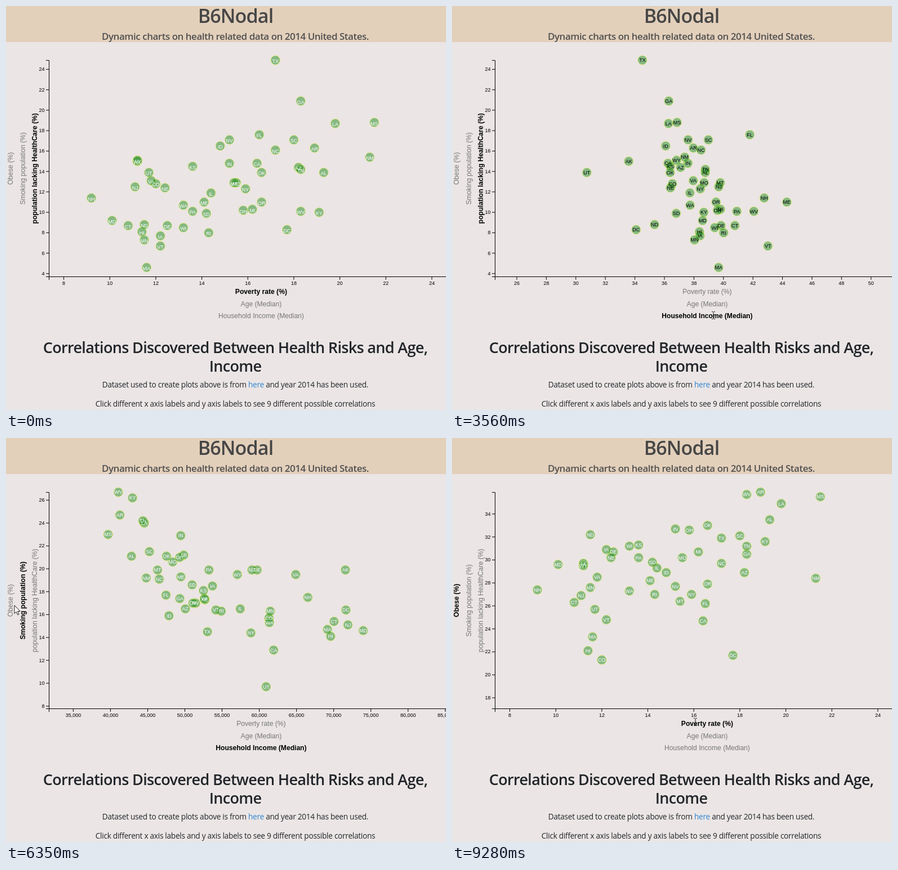
An HTML page for the animation above (9.6 s loop, 781 by 717 pixels).

```html
<!DOCTYPE html>
<html lang="en">
<head>
<meta charset="utf-8">
<title>Health risk scatter plot</title>
<style>
  html, body { margin: 0; width: 100%; height: 100%; overflow: hidden; background: #ebe5e5; }
  svg { display: block; width: 781px; height: 717px; font-family: "Liberation Sans", Arial, sans-serif; }
  .page { font-family: "Open Sans", "Noto Sans", sans-serif; text-anchor: middle; fill: #212529; }
  .head { font-weight: 600; letter-spacing: -.025em; }
  .h1 { font-size: 34px; fill: #464646; }
  .h2 { font-size: 16.9px; fill: #505050; }
  .h3 { font-size: 27px; }
  .body { font-size: 13.64px; letter-spacing: -.02em; }
  .link { fill: #2f86cf; }
  .axis path, .tick line { fill: none; stroke: #000; }
  .tick text { font-size: 9px; }
  .x text { text-anchor: middle; }
  .y text { text-anchor: end; }
  .label { font-size: 12.1px; text-anchor: middle; fill: #777; }
  .label.hover { fill: #000; }
  .label.active { fill: #000; font-weight: bold; }
  .dots circle { fill: green; stroke: #d2ec00; stroke-width: 1; opacity: .43; }
  .names { font-size: 9px; text-anchor: middle; }
</style>
</head>
<body>
<svg id="stage" viewBox="0 0 781 717">
  <rect width="781" height="64" fill="#e3d0bb"/>
  <g class="page">
    <text class="head h1" x="407.5" y="30">B6Nodal</text>
    <text class="head h2" x="407" y="60">Dynamic charts on health related data on 2014 United States.</text>
    <text class="head h3" x="407" y="616">Correlations Discovered Between Health Risks and Age,</text>
    <text class="head h3" x="407" y="649">Income</text>
    <text class="body" x="407" y="676.5">Dataset used to create plots above is from <tspan class="link">here</tspan> and year 2014 has been used.</text>
    <text class="body" x="407" y="711">Click different x axis labels and y axis labels to see 9 different possible correlations</text>
  </g>
  <g class="axis x" id="xAxis"><path d="M76.5 486V480.5H829.5V486"/></g>
  <g class="axis y" id="yAxis"><path d="M71 96.5H76.5V480.5H71"/></g>
  <g id="labels"></g>
  <g class="dots" id="dots"></g>
  <g class="names" id="names"></g>
  <g id="cursor">
    <path id="arrow" d="M0 0V14.5L3.4 11.4 5.7 16.8 8 15.8 5.7 10.5H10.2Z" fill="#fff" stroke="#000" stroke-width=".9"/>
    <path id="beam" d="M-3 -6.5H-1L0 -5.5 1 -6.5H3M0 -5.5V5.5M-3 6.5H-1L0 5.5 1 6.5H3" fill="none" stroke="#222"/>
  </g>
</svg>
<script>
const LOOP = 9600, MOVE = 1000;
const LEFT = 76.4, WIDTH = 753, BOTTOM = 480.7, HEIGHT = 384.6;

const states = ('AL AK AZ AR CA CO CT DE DC FL GA HI ID IL IN IA KS KY LA ME MD MA MI MN MS MO ' +
  'MT NE NV NH NJ NM NY NC ND OH OK OR PA RI SC SD TN TX UT VT VA WA WV WI WY').split(' ');

// One value per state, in the order above.
const data = {
  poverty: [19.3, 11.2, 18.2, 18.9, 16.4, 12, 10.8, 12.5, 17.7, 16.5, 18.3, 11.4, 14.8, 14.4, 15.2, 12.2, 13.6,
    19.1, 19.8, 14.1, 10.1, 11.6, 16.2, 11.5, 21.5, 15.5, 15.4, 12.4, 15.2, 9.2, 11.1, 21.3, 15.9, 17.2,
    11.5, 15.8, 16.6, 16.6, 13.6, 14.3, 18, 14.2, 18.3, 17.2, 11.7, 12.2, 11.8, 13.2, 18.3, 13.2, 11.2],
  age: [38.6, 33.3, 36.9, 37.8, 36, 36.3, 40.5, 39.6, 33.8, 41.6, 36.1, 38.1, 35.9, 37.5, 37.4, 38.2, 36.2,
    38.5, 36.1, 44.1, 38.3, 39.4, 39.6, 37.8, 36.7, 38.5, 39.6, 36.2, 37.4, 42.5, 39.4, 37.2, 38.2, 38.3,
    35.1, 39.4, 36.2, 39.3, 40.7, 39.8, 38.8, 36.6, 38.6, 34.3, 30.5, 42.8, 37.7, 37.5, 41.9, 39.2, 36.6],
  income: [42830, 71583, 50068, 41262, 61933, 61303, 70048, 59716, 71648, 47463, 49321, 69592, 47861, 57444,
    49446, 53712, 52504, 42958, 44555, 49462, 73971, 69160, 49847, 61481, 39680, 48363, 46328, 52686, 51450,
    66532, 71919, 44803, 58878, 46556, 59029, 49308, 47529, 51075, 53234, 54891, 45238, 50979, 44361, 53035,
    60922, 54166, 64902, 61366, 41059, 52622, 57055],
  healthcare: [13.9, 15, 14.4, 16.3, 14.8, 12.8, 8.7, 8.7, 8.3, 17.6, 20.9, 8.1, 16.5, 11.9, 14.8, 7.7, 14.5,
    10, 18.7, 11, 9.2, 4.6, 10.3, 7.3, 18.8, 12.9, 12.9, 12.4, 17.1, 11.4, 12.5, 15.4, 12.3, 16.1,
    8.8, 10.2, 13.9, 11, 10.1, 8, 17.1, 9.9, 14.2, 24.9, 13.9, 6.7, 13.1, 10.7, 10.1, 8.5, 15.1],
  smokes: [21.1, 19.9, 16.5, 24.7, 12.9, 15.7, 15.4, 19.9, 16.4, 17.7, 17.4, 14.1, 15.9, 16.5, 22.9, 18.5, 18.1,
    26.2, 24, 19.3, 14.6, 14.7, 21.2, 16.3, 23, 20.6, 19.9, 17.3, 17, 17.5, 15.1, 19.2, 14.4, 19.1,
    19.9, 21, 21.1, 17, 19.9, 16.3, 21.5, 18.6, 24.2, 14.5, 9.7, 16.4, 19.5, 15.3, 26.7, 17.4, 19.5],
  obesity: [33.5, 29.7, 28.9, 35.9, 24.7, 21.3, 26.3, 30.7, 21.7, 26.2, 30.5, 22.1, 28.9, 29.3, 32.7, 30.9, 31.3,
    31.6, 34.9, 28.2, 29.6, 23.3, 30.7, 27.6, 35.5, 30.2, 26.4, 30.2, 27.7, 27.4, 26.9, 28.4, 27, 29.7,
    32.2, 32.6, 33, 27.9, 30.2, 27, 32.1, 29.8, 31.2, 31.9, 25.7, 24.8, 28.5, 27.3, 35.7, 31.2, 29.5]
};

const labelText = {
  poverty: 'Poverty rate (%)', age: 'Age (Median)', income: 'Household Income (Median)',
  obesity: 'Obese (%)', smokes: 'Smoking population (%)', healthcare: 'population lacking HealthCare (%)'
};
const axisVars = { x: ['poverty', 'age', 'income'], y: ['obesity', 'smokes', 'healthcare'] };

const WHITE = [255, 255, 255], BLACK = [0, 0, 0], RED = [255, 0, 0];
const clicks = [
  { at: 1783, hover: 1600, axis: 'x', name: 'age', color: BLACK },
  { at: 3436, hover: 3020, axis: 'x', name: 'income', color: RED },
  { at: 4950, hover: 4650, axis: 'y', name: 'smokes', color: WHITE },
  { at: 6713, hover: 6520, axis: 'y', name: 'obesity', color: WHITE },
  { at: 8272, hover: 8080, axis: 'x', name: 'poverty', color: WHITE }
];

// Pointer path: time, x, y, and whether it is a text beam from there on.
const route = [
  [590, 588, 686, 0], [900, 492, 640, 0], [1380, 388, 537, 0], [1530, 388, 537, 0], [1700, 464, 535, 1],
  [2950, 464, 535, 1], [3240, 464, 549, 1], [3600, 464, 549, 0], [4250, 95, 352, 0], [4640, 34, 304, 1],
  [4730, 29, 298, 1], [5860, 29, 298, 0], [6200, 15, 297, 0], [6400, 15, 297, 0], [6520, 8, 295, 1],
  [6860, 8, 295, 0], [7500, 376, 453, 0], [8080, 428, 501, 1], [8180, 432, 504, 1], [LOOP, 432, 504, 1]
];

const $ = id => document.getElementById(id);
const lerp = (a, b, p) => a + (b - a) * p;
const clamp = v => Math.max(0, Math.min(1, v));
const ease = t => t < .5 ? 4 * t ** 3 : 1 - 4 * (1 - t) ** 3;

function add(parent, tag, attrs = {}, text = '') {
  const node = document.createElementNS('http://www.w3.org/2000/svg', tag);
  for (const key in attrs) node.setAttribute(key, attrs[key]);
  node.textContent = text;
  return parent.appendChild(node);
}

function makeScale(name, axis) {
  const low = Math.min(...data[name]) * .8;
  const high = Math.max(...data[name]) * (axis === 'x' ? 1.2 : 1);
  const step = name === 'income' ? 5000 : 2;
  const ticks = [];
  for (let v = Math.ceil(low / step) * step; v <= high; v += step) ticks.push(v);
  const place = v => {
    const part = (v - low) / (high - low);
    return axis === 'x' ? LEFT + part * WIDTH : BOTTOM - part * HEIGHT;
  };
  return { place, ticks: new Set(ticks) };
}

const scales = {}, labels = {}, tickNodes = { x: new Map(), y: new Map() };
for (const axis of ['x', 'y']) {
  axisVars[axis].forEach((name, i) => {
    scales[name] = makeScale(name, axis);
    const spot = axis === 'x' ? `translate(452.9 ${511 + 21.5 * i})` : `translate(${12 + 21.6 * i} 288.4) rotate(-90)`;
    labels[name] = add($('labels'), 'text', { transform: spot }, labelText[name]);
    for (const v of scales[name].ticks) {
      if (tickNodes[axis].has(v)) continue;
      const g = add($(axis + 'Axis'), 'g', { class: 'tick' });
      add(g, 'line', axis === 'x' ? { y2: 5.4 } : { x2: -5.4 });
      add(g, 'text', axis === 'x' ? { y: 14.4 } : { x: -8, y: 2.9 }, v.toLocaleString('en-US'));
      tickNodes[axis].set(v, g);
    }
  });
}
const dots = states.map(() => add($('dots'), 'circle', { r: 8.2 }));
const names = states.map(s => add($('names'), 'text', {}, s));

function sceneAt(time) {
  const scene = {
    x: { from: 'poverty', to: 'poverty', p: 1 },
    y: { from: 'healthcare', to: 'healthcare', p: 1 },
    color: WHITE, hover: ''
  };
  let ink = WHITE;
  for (const c of clicks) {
    if (time >= c.hover && time < c.at) scene.hover = c.name;
    if (time < c.at) break;
    const p = ease(clamp((time - c.at) / MOVE));
    scene[c.axis] = { from: scene[c.axis].to, to: c.name, p };
    scene.color = c.color.map((v, i) => Math.round(lerp(ink[i], v, p)));
    ink = c.color;
  }
  return scene;
}

function drawTicks(axis, { from, to, p }) {
  const a = scales[from], b = scales[to];
  for (const [v, node] of tickNodes[axis]) {
    const pos = lerp(a.place(v), b.place(v), p);
    const alpha = lerp(a.ticks.has(v), b.ticks.has(v), p);
    const seen = alpha > .01 && pos > -30 && pos < 811;
    node.style.display = seen ? '' : 'none';
    if (!seen) continue;
    node.setAttribute('transform', axis === 'x' ? `translate(${pos} 480.5)` : `translate(76.5 ${pos})`);
    node.setAttribute('opacity', alpha);
  }
}

function drawCursor(time) {
  const i = route.findIndex(r => r[0] > time);
  $('cursor').style.display = i < 1 ? 'none' : '';
  if (i < 1) return;
  const [t0, x0, y0, beam] = route[i - 1], [t1, x1, y1] = route[i];
  const p = (time - t0) / (t1 - t0);
  $('cursor').setAttribute('transform', `translate(${lerp(x0, x1, p)} ${lerp(y0, y1, p)})`);
  $('beam').style.display = beam ? '' : 'none';
  $('arrow').style.display = beam ? 'none' : '';
}

function draw(time) {
  const scene = sceneAt(time);
  const spot = ({ from, to, p }, i) => lerp(scales[from].place(data[from][i]), scales[to].place(data[to][i]), p);
  const drop = lerp(5, 3.2, ease(clamp((time - clicks[0].at) / MOVE)));

  drawTicks('x', scene.x);
  drawTicks('y', scene.y);
  states.forEach((s, i) => {
    const x = spot(scene.x, i), y = spot(scene.y, i);
    dots[i].setAttribute('cx', x);
    dots[i].setAttribute('cy', y);
    names[i].setAttribute('x', x);
    names[i].setAttribute('y', y + drop);
  });
  $('names').setAttribute('fill', `rgb(${scene.color})`);
  for (const name in labels) {
    const active = name === scene.x.to || name === scene.y.to;
    labels[name].setAttribute('class', 'label' + (active ? ' active' : name === scene.hover ? ' hover' : ''));
  }
  drawCursor(time);
}

const start = performance.now();
function frame() {
  draw((performance.now() - start) % LOOP);
  requestAnimationFrame(frame);
}
frame();
</script>
</body>
</html>
```
